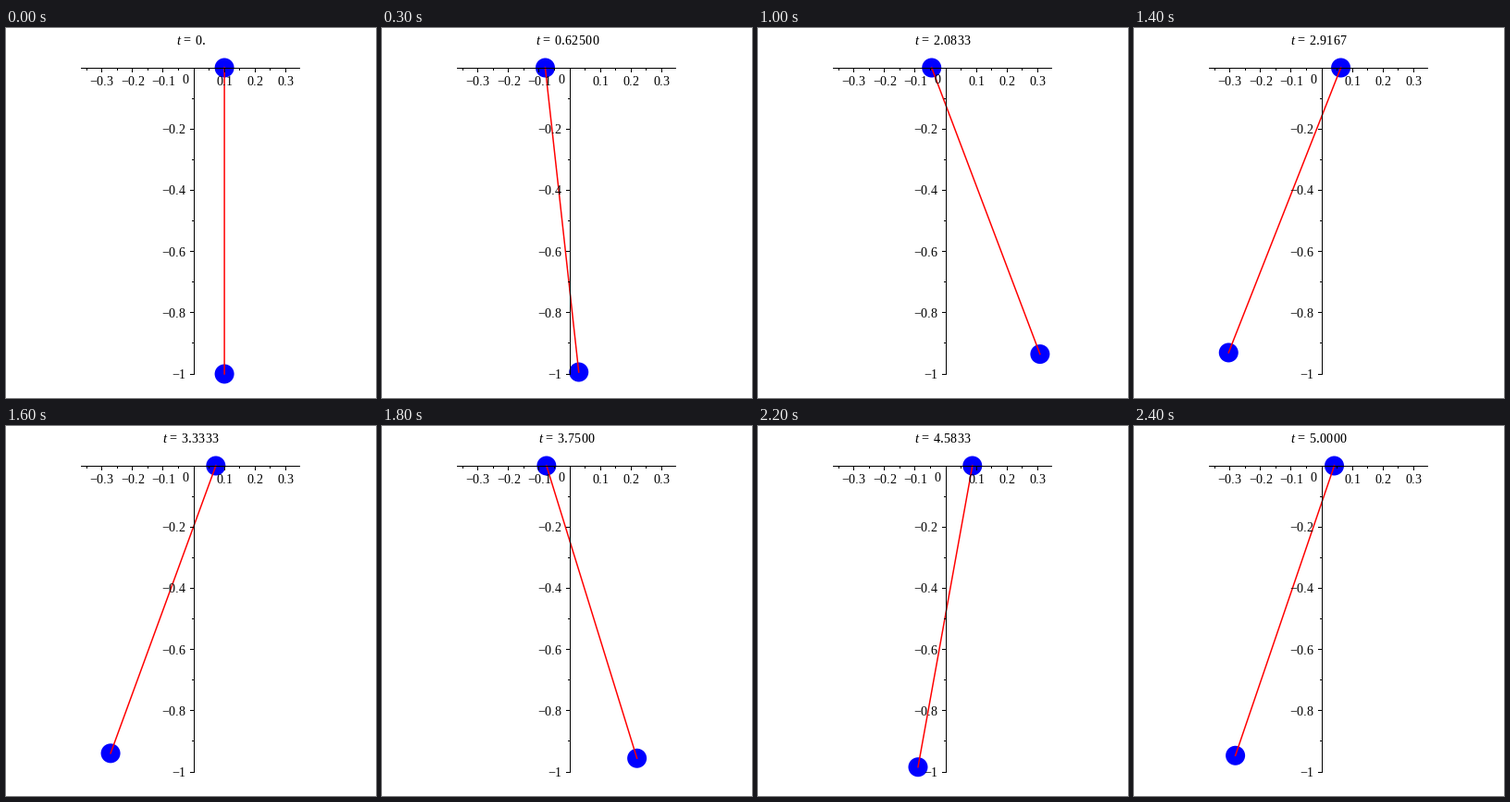
Recreate the animation shown at these times as a matplotlib script. Size 400 px wide and 400 px high, loop 2500 ms.

```python
import numpy as np
import matplotlib.pyplot as plt
from matplotlib.animation import FuncAnimation
from matplotlib.patches import Circle

FRAMES, INTERVAL, T_END = 25, 100, 5.0
G, AMP, OMEGA = 9.8, 0.1, 4.0
X0, Y0, UNIT = 203.0, 43.0, 331.0   # pixel origin and pixels per unit
PX = 0.72                           # points per pixel at 100 dpi

plt.rcParams.update({
    "font.family": "Liberation Serif",
    "text.hinting": "native",
    "text.hinting_factor": 1,
    "mathtext.fontset": "custom",
    "mathtext.rm": "Liberation Serif",
    "mathtext.it": "Liberation Serif:italic",
})


def pivot(t):
    return AMP * np.cos(OMEGA * t)


def rate(t, s):
    """Pendulum of unit length hung from the oscillating pivot."""
    theta, spin = s
    push = OMEGA**2 * pivot(t)
    return np.array([spin, push * np.cos(theta) - G * np.sin(theta)])


def swing(steps=40):
    """Angle at each frame time, by Runge-Kutta from rest."""
    h = T_END / (FRAMES - 1) / steps
    s, angles = np.zeros(2), [0.0]
    for i in range((FRAMES - 1) * steps):
        t = i * h
        a = rate(t, s)
        b = rate(t + h / 2, s + h / 2 * a)
        c = rate(t + h / 2, s + h / 2 * b)
        d = rate(t + h, s + h * c)
        s = s + h / 6 * (a + 2 * b + 2 * c + d)
        if (i + 1) % steps == 0:
            angles.append(s[0])
    return angles


def to_px(x, y):
    return X0 + UNIT * x, Y0 - UNIT * y


def mid(v):
    """Centre of the pixel that holds v."""
    return np.floor(v + 1e-6) + 0.5


def rule(x1, y1, x2, y2):
    ax.plot([x1, x2], [y1, y2], color="black", lw=PX, zorder=4,
            solid_capstyle="butt", snap=False)


def label(x, y, s, ha="center", size=14):
    return ax.text(x, y, s, ha=ha, va="baseline", fontsize=size * PX, zorder=5)


def number(v):
    return f"{v:g}".replace("-", "\u2212")


def draw_axes():
    rule(81, mid(Y0), 318, mid(Y0))
    rule(mid(X0), Y0, mid(X0), Y0 + UNIT + 1)
    for k in range(-7, 7):
        x = to_px(k * 0.05, 0)[0]
        major = k % 2 == 0
        rule(mid(x), Y0, mid(x), Y0 + (5 if major else 3))
        if major and k:
            label(x, 62, number(k * 0.05))
    for k in range(11):
        y = to_px(0, -k * 0.1)[1]
        major = k % 2 == 0
        rule(X0 - (4 if major else 2), mid(y), X0, mid(y))
        if major and k:
            label(194, round(y + 5), number(-k * 0.1), "right")
    label(197, 60, "0", "right")


fig = plt.figure(figsize=(4, 4), dpi=100, facecolor="white")
ax = fig.add_axes([0, 0, 1, 1])
ax.set(xlim=(0, 400), ylim=(400, 0))
ax.axis("off")
draw_axes()

balls = [ax.add_patch(Circle((0, 0), 10.5, fc="blue", lw=0, zorder=2))
         for _ in range(2)]
rod, = ax.plot([], [], color="red", lw=1.5 * PX, zorder=3, snap=False)
title = label(200.5, 18, "", size=15)
angles = swing()


def update(i):
    t = T_END * i / (FRAMES - 1)
    x, theta = pivot(t), angles[i]
    ends = [to_px(x, 0), to_px(x + np.sin(theta), -np.cos(theta))]
    for ball, end in zip(balls, ends):
        ball.center = end
    rod.set_data(*zip(*ends))
    title.set_text(f"$t$ = {t:#.5g}" if i else "$t$ = 0.")
    return [*balls, rod, title]


anim = FuncAnimation(fig, update, frames=FRAMES, interval=INTERVAL,
                     repeat=True, repeat_delay=0)
plt.show()
```
